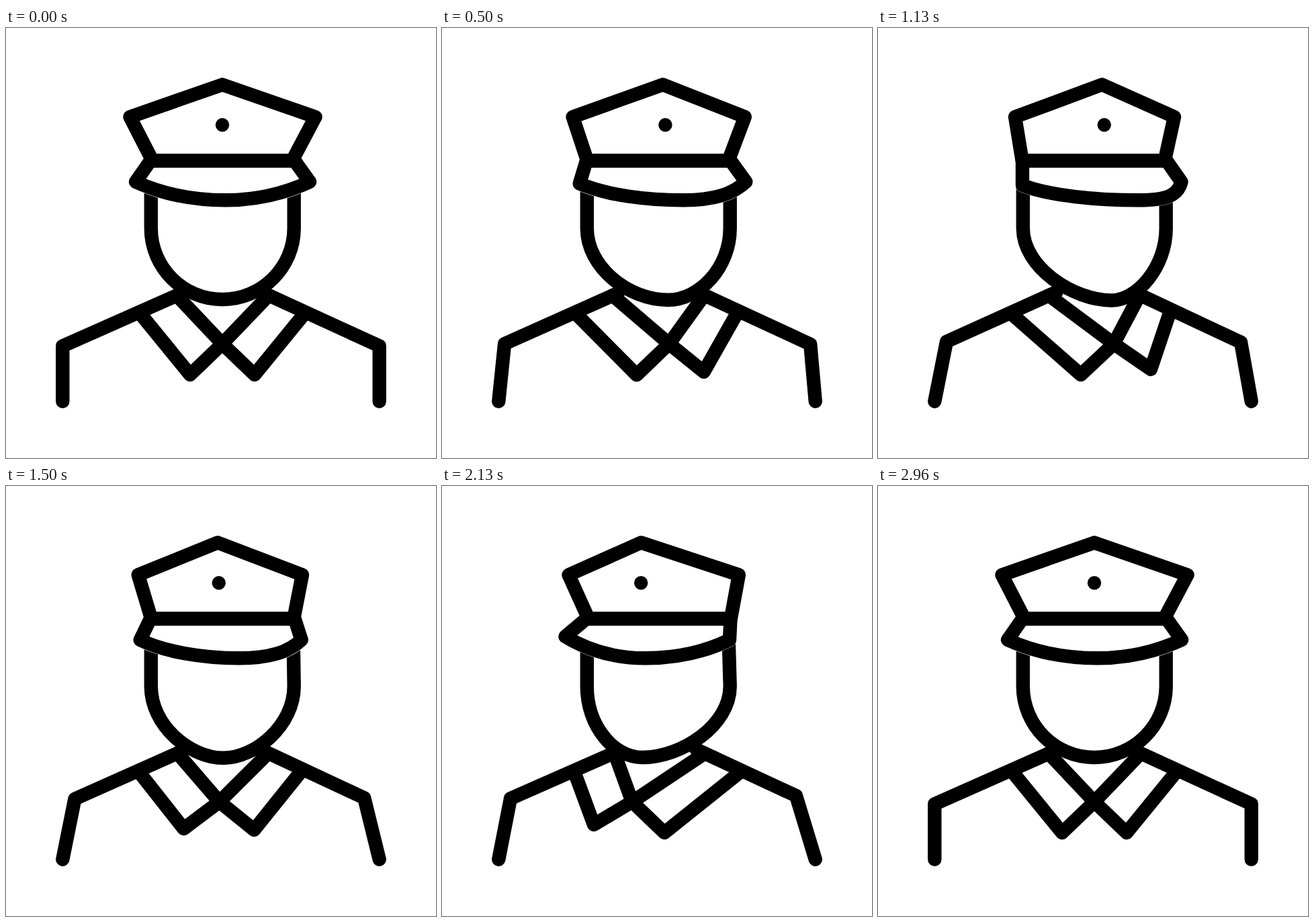
An HTML page that plays this animation: 640x640 px, repeating every 3 s.

```html
<!DOCTYPE html>
<html lang="en">
<head>
<meta charset="utf-8">
<title>Officer icon</title>
<style>
  html, body { margin: 0; width: 100%; height: 100%; overflow: hidden; background: #fff; }
  svg { display: block; width: 100vw; height: 100vh; }
  path { fill: none; stroke: #000; stroke-width: 20.4; stroke-linecap: round; stroke-linejoin: round; }
  #visorEdge { fill: #fff; stroke: #fff; stroke-width: 21.2; }
</style>
</head>
<body>
<svg viewBox="0 0 640 640">
  <path id="body"/>
  <path id="collar"/>
  <path id="face"/>
  <path id="visorEdge"/>
  <path id="visor"/>
  <path id="hat"/>
  <circle id="badge" cy="144.3" r="10.2"/>
</svg>
<script>
const LOOP = 3000, FPS = 24;

// Each value: facing front, turned right, turned left
const poses = {
  hatL: [184.5, 204.7, 188.7], peak: [322, 335.2, 295], hatR: [460.5, 441, 440.9],
  baseL: [218, 214.5, 218], baseR: [426, 426.5, 430],
  badge: [322, 338.6, 294.9],
  brimLX: [193, 216.4, 183], brimLY: [229, 234.4, 223.8], brimRX: [452, 452.6, 426.8],
  brimX: [327, 392, 302],
  curveLX: [235, 257, 214], curveLY: [248, 250, 243], curveL2: [280, 330, 255],
  curveR2: [375, 434, 350], curveRX: [415, 449, 392], curveRY: [246, 249, 246],
  chinX: [322, 350.3, 297.3], chinY: [404, 405.5, 404],
  chinL: [58.5, 58, 43], chinR: [58.5, 36, 58], templeX: [428.7, 428.7, 426.8],
  elbowLX: [84.3, 102, 102.9], elbowLY: [473.3, 466.8, 464.7],
  elbowRX: [555.7, 540.7, 525.6], elbowRY: [473.3, 468.1, 460.5],
  endL: [258, 266, 254], endR: [386, 392, 378],
  knot: [322, 354.1, 281.1],
  tipLX: [274, 305.4, 223.6], tipLY: [516, 516.6, 503.4],
  tipRX: [370, 409.4, 329.1], tipRY: [516, 507.6, 516],
  flapL: [200.5, 199.5, 197], flapR: [443.5, 433, 443.5],
  neckL: [254, 254, 257], neckR: [391, 389, 391]
};

const smooth = u => u * u * (3 - 2 * u);
const quickStart = u => u + u * u - u * u * u;

// Start time, end time, start pose, end pose
const turns = [[0, 1000, 0, 1], [1000, 2000, 1, 2], [2000, 2958, 2, 0]];

const el = id => document.getElementById(id);
const setPath = (id, d) => el(id).setAttribute('d', d);

function draw(time) {
  const [start, end, from, to] = turns.find(turn => time < turn[1]) || turns[2];
  const u = Math.min(1, (time - start) / (end - start));
  const p = {};
  for (const name in poses) {
    const v = poses[name];
    const ease = name === 'badge' && start === 0 ? quickStart : smooth;
    p[name] = v[from] + (v[to] - v[from]) * ease(u);
  }

  // The shoulders slope up at a near constant rate towards the neck
  const endLY = 392.8 + (266 - p.endL) * 0.445;
  const endRY = 391.8 + (p.endR - 378) * 0.465;
  setPath('body',
    `M84.3 555.7L${p.elbowLX} ${p.elbowLY}L${p.endL} ${endLY}` +
    `M555.7 555.7L${p.elbowRX} ${p.elbowRY}L${p.endR} ${endRY}`);
  setPath('collar',
    `M${p.flapL} 426L${p.tipLX} ${p.tipLY}L${p.knot} 470L${p.neckR} 398` +
    `M${p.flapR} 426L${p.tipRX} ${p.tipRY}L${p.knot} 470L${p.neckL} 398`);
  setPath('face',
    `M215.8 236V298C215.8 356.5 ${p.chinX - p.chinL} ${p.chinY} ${p.chinX} ${p.chinY}` +
    `C${p.chinX + p.chinR} ${p.chinY} 428.7 356.5 428.7 298L${p.templeX} 236`);

  const visor =
    `M215 197.5L${p.brimLX} ${p.brimLY}` +
    `C${p.curveLX} ${p.curveLY} ${p.curveL2} 256.3 ${p.brimX} 256.3` +
    `C${p.curveR2} 256.3 ${p.curveRX} ${p.curveRY} ${p.brimRX} 229L429.5 197.5Z`;
  setPath('visorEdge', visor);
  setPath('visor', visor);
  setPath('hat',
    `M${p.baseL} 197.5L${p.hatL} 132.3L${p.peak} 84.3L${p.hatR} 132.3L${p.baseR} 197.5Z`);
  el('badge').setAttribute('cx', p.badge);
}

const origin = performance.now();
function tick() {
  const time = (performance.now() - origin) % LOOP;
  const step = Math.floor((time + 2) * FPS / 1000) % (LOOP * FPS / 1000);
  draw(step * 1000 / FPS);
  requestAnimationFrame(tick);
}
tick();
</script>
</body>
</html>
```
